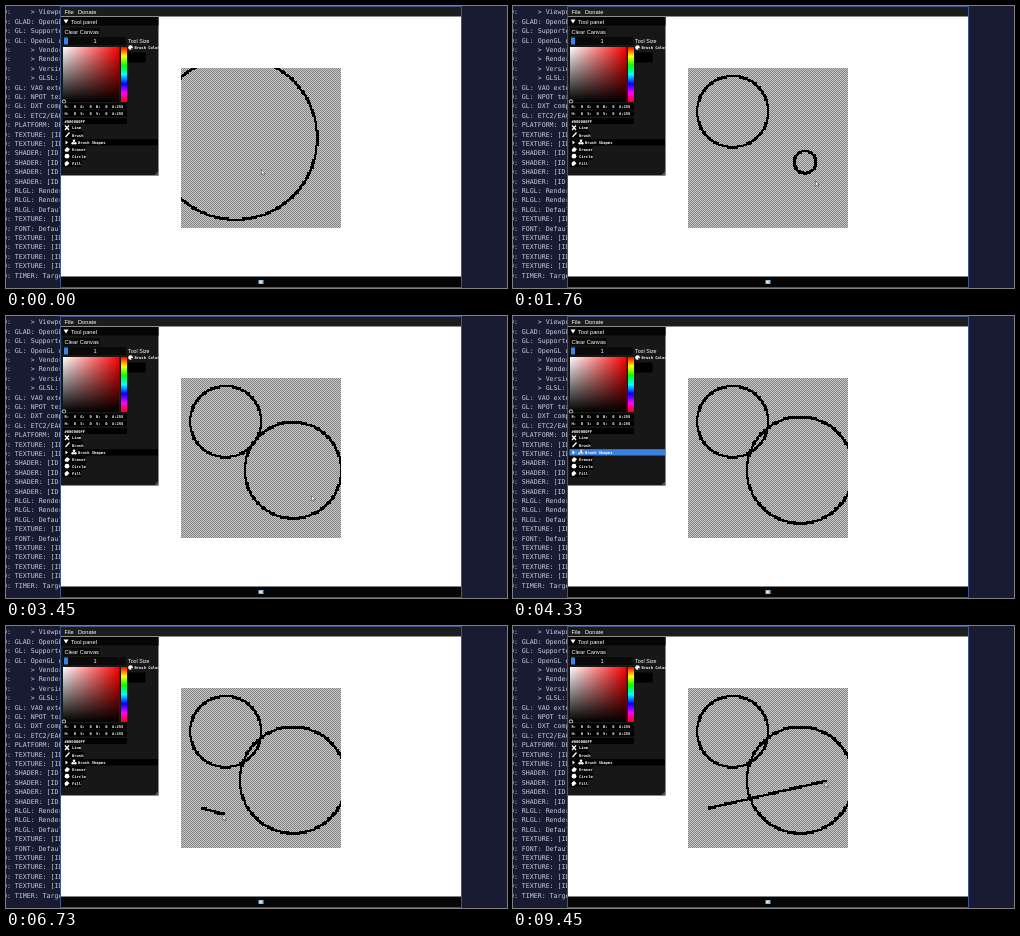
Write an HTML page that moves like this. It is 501 by 282 pixels and loops after 9480 ms.

```html
<!DOCTYPE html>
<html lang="en">
<head>
<meta charset="utf-8">
<title>Pixel drawing tool</title>
<style>
  html, body { margin: 0; width: 100%; height: 100%; overflow: hidden; background: #181b31; }
  svg { display: block; }
  text { white-space: pre; }
  .log { font: 6.6px "DejaVu Sans Mono", monospace; fill: #c9cddd; }
  .ui { font: 5.7px "Liberation Sans", Arial, sans-serif; fill: #fff; }
  .small { font: bold 3.8px "DejaVu Sans Mono", monospace; fill: #fff; }
  .pixels { shape-rendering: crispEdges; }
</style>
</head>
<body>
<svg width="501" height="282" viewBox="0 0 501 282">
  <defs>
    <linearGradient id="sat"><stop stop-color="#fff"/><stop offset="1" stop-color="#f00"/></linearGradient>
    <linearGradient id="val" x2="0" y2="1"><stop stop-opacity="0"/><stop offset="1"/></linearGradient>
    <linearGradient id="hue" x2="0" y2="1"></linearGradient>
    <pattern id="checker" width="2" height="2" patternUnits="userSpaceOnUse">
      <path fill="#c8c8c8" d="M0 0h2v2h-2z"/><path fill="#828282" d="M0 0h1v1h-1zM1 1h1v1h-1z"/>
    </pattern>
    <clipPath id="sheet"><path d="M175 62h160v160h-160z"/></clipPath>
  </defs>

  <path fill="#181b31" d="M0 0h501v282H0z"/>
  <g id="log" class="log"></g>

  <!-- window -->
  <path fill="#3d568f" d="M54 0h402v282H54z"/>
  <path fill="#fff" d="M55 10h400v262H55z"/>
  <path fill="#1c1c1c" d="M55 1h400v9.500H55z"/>
  <path fill="#050505" d="M55 270.500h400V281H55z"/>
  <path fill="#8fbfe0" d="M252.500 274h5v4h-5z"/>
  <path fill="#e8f2fa" d="M253.500 275h2v2h-2z"/>
  <g class="ui"><text x="58.500" y="8">File</text><text x="72" y="8">Donate</text></g>

  <!-- drawing -->
  <g class="pixels">
    <path fill="url(#checker)" d="M175 62h160v160h-160z"/>
    <path id="art" clip-path="url(#sheet)"/>
  </g>

  <!-- tool panel -->
  <path fill="#171717" d="M55 11h97.500v158.500H55z"/>
  <path fill="#050505" d="M55 11h97.500v8.500H55z"/>
  <path fill="#fff" d="M57.500 13.500h5l-2.500 4z"/>
  <path fill="#090909" d="M57 22h37v7.500H57zM57 31h63v8H57z"/>
  <path fill="#3d85e0" d="M58 31.500h4v7h-4z"/>
  <g class="ui">
    <text x="65" y="17.500">Tool panel</text><text x="58.500" y="28">Clear Canvas</text>
    <text x="87.500" y="37">1</text><text x="122" y="37" style="font-size:5.300px">Tool Size</text>
  </g>
  <path fill="url(#sat)" d="M57 41h56.500v55H57z"/>
  <path fill="url(#val)" d="M57 41h56.500v55H57z"/>
  <path fill="url(#hue)" d="M115 41h6v55h-6z"/>
  <circle cx="58" cy="95.500" r="1.700" stroke="#fff" stroke-width=".8"/>
  <path d="M122 46.500h17.500v10H122zM57 97.500h64v6H57zM57 104.500h64v6H57zM57 112h64v6H57z"/>
  <circle cx="124.500" cy="41.500" r="2.300" fill="#fff"/><circle cx="125.800" cy="42.800" r=".7"/>
  <text class="small" x="128.500" y="43.300">Brush Color</text>
  <g id="fields" class="small"></g>
  <g id="tools" class="small"></g>
  <path stroke="#fff" stroke-width="1.300" d="M59 119.500l4 4.500M63 119.500l-4 4.500M59.500 131l4-4.500"/>
  <g fill="#fff">
    <path d="M59.500 134.500v4l2.500-2z"/>
    <circle cx="68" cy="134.700" r="1.300"/><circle cx="66.700" cy="137.300" r="1.300"/><circle cx="69.300" cy="137.300" r="1.300"/>
    <path d="M58.500 144l2.500-3 3 2-2 2.800h-2.500z"/>
    <circle cx="61" cy="150.200" r="2.400"/>
    <path d="M58.500 157l2.500-2.200 2.500 2.500-2.500 2.500h-2z"/>
  </g>
  <path fill="#555" d="M152 165.500v3.500h-3.500z"/>

  <path id="cursor" d="M0 0v5l1.200-.9.8 1.700 1-.5-.8-1.600h1.500z" fill="#fff" stroke="#222" stroke-width=".45"/>
</svg>
<script>
const $ = id => document.getElementById(id);

function add(parent, tag, attrs, text = "") {
  const el = document.createElementNS("http://www.w3.org/2000/svg", tag);
  for (const name in attrs) el.setAttribute(name, attrs[name]);
  el.textContent = text;
  $(parent).append(el);
  return el;
}
const label = (parent, x, y, text) => add(parent, "text", { x, y }, text);

const repeat = (n, text) => Array(n).fill(text);
const log = [
  "    > Viewport", "GLAD: OpenGL", "GL: Supported", "GL: OpenGL device",
  "    > Vendor", "    > Renderer", "    > Version", "    > GLSL:",
  "GL: VAO extension", "GL: NPOT textures", "GL: DXT compressed", "GL: ETC2/EAC",
  "PLATFORM: DESKTOP", ...repeat(2, "TEXTURE: [ID"), ...repeat(4, "SHADER: [ID"),
  ...repeat(2, "RLGL: Render"), "RLGL: Default", "TEXTURE: [ID", "FONT: Default",
  ...repeat(4, "TEXTURE: [ID"), "TIMER: Target"
];
log.forEach((text, i) => label("log", -15, 8.4 + i * 9.4, "INFO: " + text));

for (let i = 0; i <= 6; i++)
  add("hue", "stop", { offset: i / 6, "stop-color": `hsl(${i * 60} 100% 50%)` });

["RGB", "HSV"].forEach((model, row) => [...model, "A"].forEach((channel, i) =>
  label("fields", 58.5 + i * 15.8, 101.8 + row * 7, channel + (channel == "A" ? ":255" : ":  0"))));
label("fields", 58.5, 116.5, "#000000FF");

const tools = ["Line", "Brush", "Brush Shapes", "Eraser", "Circle", "Fill"].map((name, i) => {
  const wide = name == "Brush Shapes", y = 119 + i * 7.1;
  const width = wide ? 95.5 : 9 + 2.35 * name.length;
  const box = add("tools", "rect", { x: 56.5, y, width, height: 6.3 });
  label("tools", wide ? 72 : 66, y + 4.4, name);
  return { box, y, width };
});

// Key poses: [time, ...values]
const firstCircle = [[0, 229.5, 132, 81.5], [1000, 219.5, 105.5, 35.5]];
const secondCircle = [[1550, 292, 156, 2], [1760, 292, 156, 11],
  [2970, 286.5, 154.5, 17.5], [3600, 287, 154, 53.2]];
const lineEnd = [[6100, 196, 182], [6730, 217, 188], [8210, 263, 143], [9450, 312, 155]];

function pose(keys, t) {
  const i = keys.findIndex(k => k[0] > t);
  if (i < 0) return keys.at(-1).slice(1);
  if (!i) return keys[0].slice(1);
  const a = keys[i - 1], b = keys[i], u = (t - a[0]) / (b[0] - a[0]), e = u * u * (3 - 2 * u);
  return a.slice(1).map((v, j) => v + (b[j + 1] - v) * e);
}

// The pointer trails the circle's centre, visits the panel, then follows the line.
const hand = ([x, y, r]) => [x + 8 + r * .22, y + 17 + r * .18];

function pointer(t) {
  if (t < 1550) return pose([[1150, ...hand(pose(firstCircle, t))], [1550, ...hand(secondCircle[0].slice(1))]], t);
  if (t < 3850) return hand(pose(secondCircle, t));
  if (t < 6100) return pose([[3850, ...hand(pose(secondCircle, t))],
    [4330, 67, 133.4], [4700, 66, 121], [5100, 66, 121], [5900, 196, 183]], t);
  const [x, y] = pose(lineEnd, t);
  return [x, y + 1];
}

const CELL = 1.25, BRUSH = 2 * CELL;
const snap = v => Math.round((v - BRUSH / 2) / CELL) * CELL;

function trace(n, point) {
  const dots = new Set();
  for (let i = 0; i <= n; i++) {
    const [x, y] = point(i / n);
    dots.add(`M${snap(x)} ${snap(y)}h${BRUSH}v${BRUSH}h-${BRUSH}z`);
  }
  return [...dots].join("");
}

const circle = ([x, y, r]) => trace(Math.ceil(r * 6), u =>
  [x + r * Math.cos(u * 2 * Math.PI), y + r * Math.sin(u * 2 * Math.PI)]);

const segment = ([x0, y0], [x1, y1]) => trace(150, u =>
  [x0 + (x1 - x0) * u, y0 + (y1 - y0) * u]);

function draw(t) {
  let d = circle(pose(firstCircle, t));
  if (t >= 1550) d += circle(pose(secondCircle, t));
  if (t >= 6100) d += segment(pose(lineEnd, 0), pose(lineEnd, t));
  $("art").setAttribute("d", d);

  const [x, y] = pointer(t);
  $("cursor").setAttribute("transform", `translate(${x} ${y})`);
  for (const tool of tools) {
    const over = x > 56 && x < 56 + tool.width && y >= tool.y && y < tool.y + 6.3;
    tool.box.setAttribute("fill", over ? "#3b82e0" : "#000");
  }
}

const start = performance.now();
function tick() {
  draw((performance.now() - start) % 9480);
  requestAnimationFrame(tick);
}
tick();
</script>
</body>
</html>
```
